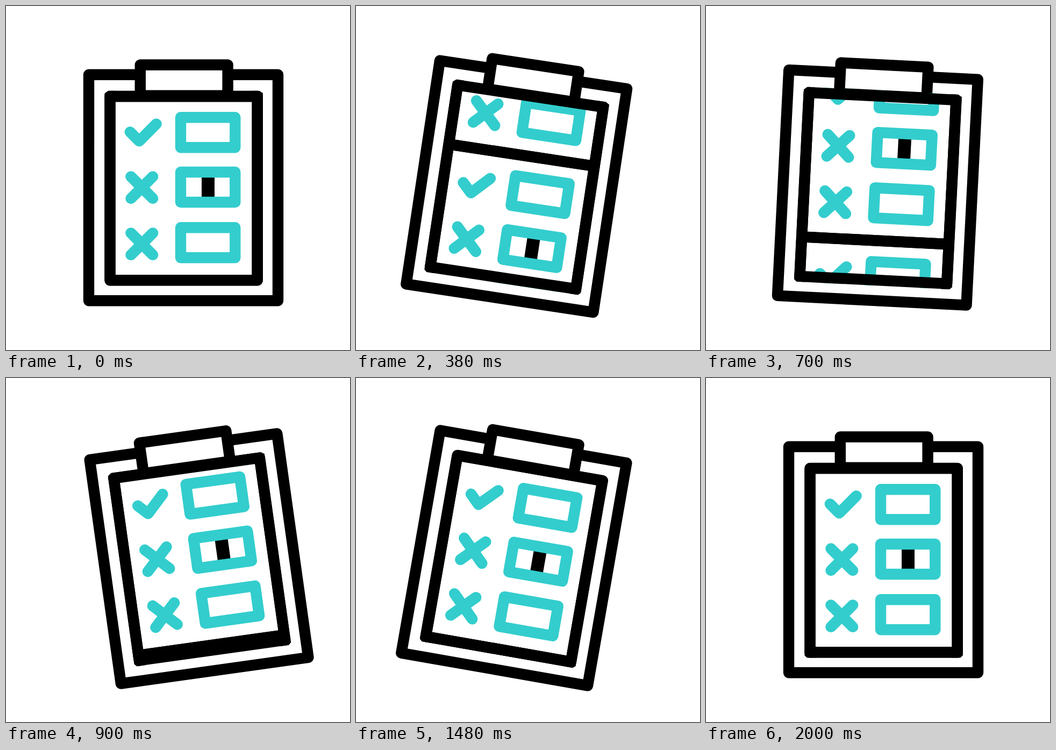
Animation, 640 px wide and 640 px high, one loop 2020 ms. Source, as an HTML page:

```html
<!DOCTYPE html>
<html lang="en">
<head>
<meta charset="utf-8">
<title>Swinging clipboard</title>
<style>
  html, body { margin: 0; width: 100%; height: 100%; overflow: hidden; background: #fff; }
  svg { display: block; width: 100%; height: 100%; }
  .ink, .teal { fill: none; stroke-width: 20.4; stroke-linejoin: round; stroke-linecap: round; }
  .ink { stroke: #000; }
  .teal { stroke: #33cdcd; }
</style>
</head>
<body>
<svg viewBox="0 0 640 640">
  <defs>
    <clipPath id="window">
      <path d="M183.2 163 L190 157.7 H471 L478 162 V516 L473 520.5 H188 L183.2 516 Z"/>
    </clipPath>
    <g id="sheet">
      <rect class="ink" x="193.5" y="168" width="274.2" height="342.2"/>
      <rect x="364" y="315" width="24" height="44"/>
      <g class="teal">
        <path d="M230.8 234.4 l17 17 l31.8 -32"/>
        <path id="cross" d="M232.4 317.4 l40.7 40.7 m0 -40.7 l-40.7 40.7"/>
        <use href="#cross" y="105"/>
        <rect x="325" y="207.3" width="101.3" height="56"/>
        <rect x="325" y="309" width="101.3" height="56"/>
        <rect x="325" y="412.2" width="101.3" height="56"/>
      </g>
    </g>
  </defs>
  <g id="board">
    <rect class="ink" x="154" y="127.8" width="352" height="420.5"/>
    <rect class="ink" x="249.8" y="109.5" width="162.8" height="57.3" style="fill:#fff"/>
    <g clip-path="url(#window)">
      <rect x="193.5" y="168" width="274.2" height="342.2" fill="#fff"/>
      <g id="scroll">
        <use href="#sheet"/>
        <use href="#sheet" y="-342.2"/>
      </g>
    </g>
    <rect class="ink" x="193.5" y="168" width="274.2" height="342.2"/>
  </g>
</svg>
<script>
  const LOOP = 2020;
  const SHEET_HEIGHT = 342.2;
  const SWING = [0, 10, -10, 10, 0]; // degrees at every half second
  const board = document.getElementById('board');
  const scroll = document.getElementById('scroll');

  const ease = u => u * u * (3 - 2 * u);

  function swingAngle(t) {
    const beat = Math.min(Math.floor(t / 500), SWING.length - 2);
    const from = SWING[beat], to = SWING[beat + 1];
    return from + (to - from) * ease(t / 500 - beat);
  }

  function draw(now) {
    const t = Math.min(now % LOOP, 2000);
    const shift = SHEET_HEIGHT * ease(Math.min(t / 1000, 1));
    board.setAttribute('transform', `rotate(${swingAngle(t)} 330 128)`);
    scroll.setAttribute('transform', `translate(0 ${shift})`);
  }

  const start = performance.now();
  function tick() {
    draw(performance.now() - start);
    requestAnimationFrame(tick);
  }
  tick();
</script>
</body>
</html>
```
